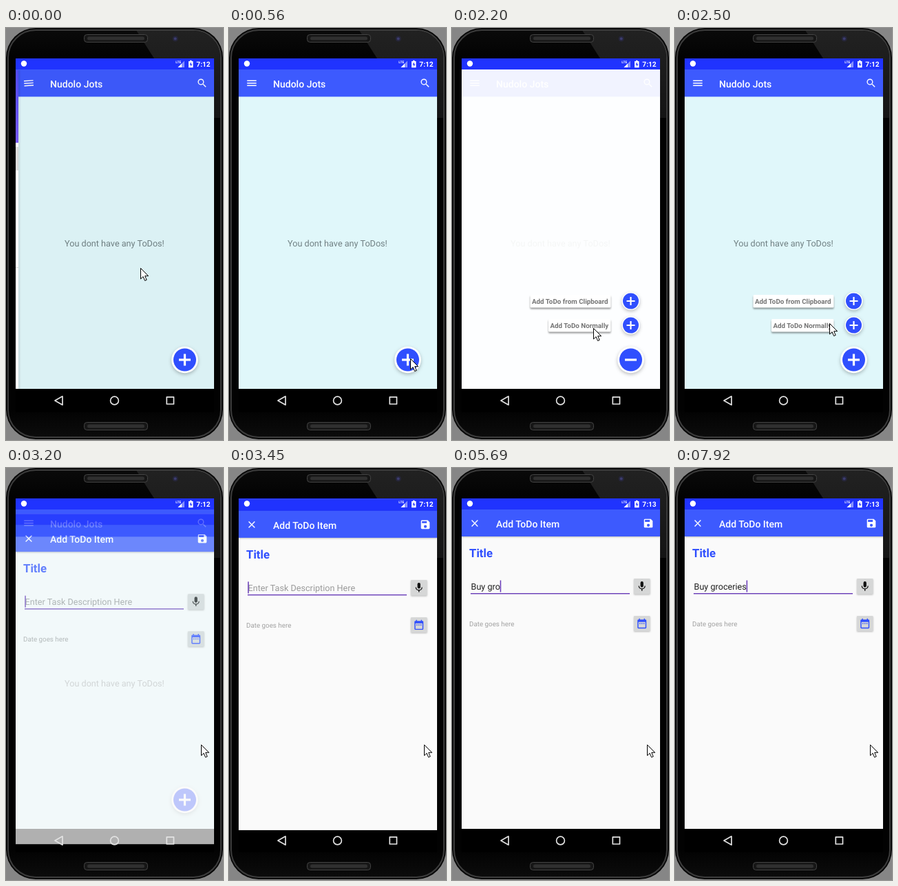
Recreate the animation shown at these times as an HTML page. Size 315x596 px, loop 8000 ms.

```html
<!DOCTYPE html>
<html lang="en">
<head>
<meta charset="utf-8">
<title>To-do app demo</title>
<style>
html, body { margin: 0; width: 100%; height: 100%; overflow: hidden; background: #868686; }
svg { display: block; width: 100vw; height: 100vh; }
text { font-family: Roboto, "Noto Sans", sans-serif; white-space: pre; text-rendering: geometricPrecision; }
.bar-title { font-size: 14px; font-weight: 500; fill: #fff; }
.body { font-size: 12.65px; }
.label { font-size: 9.8px; font-weight: 700; fill: #757575; }
.lift { filter: drop-shadow(0 2px 1.3px rgba(0, 0, 0, .4)); }
.float { filter: drop-shadow(0 2px 2.5px rgba(0, 0, 0, .25)); }
.bar { filter: drop-shadow(0 1px 1px rgba(0, 0, 0, .25)); }
</style>
</head>
<body>
<svg viewBox="0 0 315 596" preserveAspectRatio="none">
  <defs>
    <linearGradient id="shell" x2="0" y2="1">
      <stop offset="0" stop-color="#0a0a0a"/><stop offset=".07" stop-color="#020202"/>
      <stop offset=".93" stop-color="#020202"/><stop offset="1" stop-color="#0c0c0c"/>
    </linearGradient>
    <linearGradient id="sheen" x2="0" y2="1">
      <stop offset="0" stop-color="#222"/><stop offset="1" stop-color="#141414"/>
    </linearGradient>
    <linearGradient id="header" x2="0" y2="1">
      <stop offset="0" stop-color="#4f4cf0"/><stop offset="1" stop-color="#7658f2"/>
    </linearGradient>
    <linearGradient id="edge">
      <stop offset="0" stop-opacity=".1"/><stop offset="1" stop-opacity="0"/>
    </linearGradient>
    <clipPath id="screen"><rect x="14" y="44" width="288" height="512"/></clipPath>
    <clipPath id="body"><rect x="4" y="4" width="307" height="588" rx="39"/></clipPath>
    <g id="speaker">
      <rect x="113.5" y="-5.5" width="92" height="11" rx="4" fill="#161616" stroke="#444"/>
      <rect x="118" y="-2.5" width="83" height="5" rx="2.5" fill="#303030"/>
    </g>
    <path id="menu" d="M3 18h18v-2H3zm0-5h18v-2H3zm0-7v2h18V6z"/>
    <path id="close" d="M19 6.4 17.6 5 12 10.6 6.4 5 5 6.4 10.6 12 5 17.6 6.4 19 12 13.4 17.6 19 19 17.6 13.4 12z"/>
    <path id="search" d="M15.5 14h-.8l-.3-.3A6.5 6.5 0 1 0 13.7 14.4l.3.3v.8l5 5 1.5-1.5zm-6 0a4.5 4.5 0 1 1 0-9 4.5 4.5 0 0 1 0 9z"/>
    <path id="save" d="M17 3H5a2 2 0 0 0-2 2v14a2 2 0 0 0 2 2h14a2 2 0 0 0 2-2V7zm-5 16a3 3 0 1 1 0-6 3 3 0 0 1 0 6zm3-10H5V5h10z"/>
    <path id="mic" d="M12 14a3 3 0 0 0 3-3V5a3 3 0 0 0-6 0v6a3 3 0 0 0 3 3zm5.3-3a5.3 5.1 0 0 1-10.6 0H5a7 7 0 0 0 6 6.7V21h2v-3.3A7 7 0 0 0 19 11z"/>
    <path id="date" d="M9 11H7v2h2zm4 0h-2v2h2zm4 0h-2v2h2zm2-7h-1V2h-2v2H8V2H6v2H5a2 2 0 0 0-2 2v14a2 2 0 0 0 2 2h14a2 2 0 0 0 2-2V6a2 2 0 0 0-2-2zm0 16H5V9h14z"/>
    <g id="mini">
      <circle r="13" fill="#fff" class="float"/>
      <circle r="11.5" fill="#304ffe"/>
      <path d="M-6 0H6M0-6V6" stroke="#fff" stroke-width="2.2"/>
    </g>
  </defs>

  <!-- phone -->
  <rect width="315" height="596" fill="#868686"/>
  <rect width="315" height="595" rx="43" fill="#080808"/>
  <rect x="3" y="3" width="309" height="589" rx="40" fill="url(#shell)" stroke="#3c3c3c" stroke-width="2"/>
  <path d="M187 0H315V130H302V44H215z" fill="url(#sheen)" clip-path="url(#body)"/>
  <use href="#speaker" y="15"/>
  <use href="#speaker" y="576"/>
  <circle cx="245.7" cy="15.5" r="4" fill="#26263a"/>
  <circle cx="245.7" cy="15.5" r="2" fill="#3c3c70"/>
  <rect x="14" y="44" width="288" height="512" fill="#000"/>

  <g clip-path="url(#screen)">
    <rect x="14" y="44" width="288" height="17" fill="#2033fe"/>

    <g id="home">
      <rect x="14" y="60" width="288" height="462" fill="#e0f7fa"/>
      <rect x="14" y="60" width="288" height="39.4" fill="#3d5afe"/>
      <g id="burger"><use href="#menu" fill="#fff" transform="translate(33 79.8) scale(.75 .7) translate(-12 -12)"/></g>
      <text class="bar-title" x="64" y="85.6">Nudolo Jots</text>
      <use href="#search" fill="#fff" transform="translate(284.7 79.8) scale(.7) translate(-12 -12)"/>
      <text class="body" x="85" y="315.6" fill="#708083">You dont have any ToDos!</text>
      <g id="drawer">
        <rect x="14" y="61" width="288" height="461" opacity=".025"/>
        <rect x="18" y="61" width="4" height="461" fill="url(#edge)"/>
        <rect x="14" y="61" width="4" height="461" fill="#fff"/>
        <rect x="14" y="61" width="4" height="105" fill="url(#header)"/>
        <rect x="14" y="172" width="4" height="34" fill="#dcdcdc"/>
        <rect x="14" y="346" width="4" height="1" fill="#ddd"/>
      </g>
      <rect id="veil" x="14" y="60" width="288" height="462" fill="#fff" opacity=".93"/>
      <g id="clip">
        <rect class="lift" x="113.5" y="386" width="117" height="18.5" rx="1.5" fill="#fff"/>
        <text class="label" x="116" y="399">Add ToDo from Clipboard</text>
        <use href="#mini" x="259.5" y="395"/>
      </g>
      <g id="normal">
        <rect class="lift" x="140" y="421" width="90.5" height="18.5" rx="1.5" fill="#fff"/>
        <text class="label" x="142.5" y="434">Add ToDo Normally</text>
        <use href="#mini" x="259.5" y="430"/>
      </g>
      <g transform="translate(259.5 480)">
        <circle r="19.3" fill="#fff" class="float"/>
        <circle r="16.5" fill="#304ffe"/>
        <path id="minus" d="M-8.5 0H8.5" stroke="#fff" stroke-width="3.2"/>
        <path id="upright" d="M0-8.5V8.5" stroke="#fff" stroke-width="3.2"/>
      </g>
    </g>

    <g id="editor">
      <rect x="14" y="44" width="288" height="478" fill="#fafafa"/>
      <rect x="14" y="44" width="288" height="17" fill="#2033fe"/>
      <rect class="bar" x="14" y="60" width="288" height="39" fill="#3d5afe"/>
      <use href="#close" fill="#fff" transform="translate(33 80) scale(.7) translate(-12 -12)"/>
      <text class="bar-title" x="64" y="85.6">Add ToDo Item</text>
      <use href="#save" fill="#fff" transform="translate(285 80) scale(.7) translate(-12 -12)"/>
      <text x="25" y="128.7" font-size="16.8" font-weight="700" fill="#304ffe">Title</text>
      <text id="field" class="body" x="27.5" y="175.8"></text>
      <rect x="27" y="181" width="231" height="1.4" fill="#673ab7"/>
      <rect id="caret" y="162.5" width="1.5" height="17" fill="#673ab7"/>
      <rect class="bar" x="264" y="160" width="23.5" height="22.5" rx="1" fill="#d6d7d7"/>
      <use href="#mic" fill="#111" transform="translate(275.7 171.2) scale(.72) translate(-12 -12)"/>
      <text x="25" y="229" font-size="9.8" fill="#a2a2a2">Date goes here</text>
      <rect class="bar" x="264" y="214" width="23.5" height="22" rx="1" fill="#d6d7d7"/>
      <use href="#date" fill="#304ffe" transform="translate(275.7 225) scale(.72) translate(-12 -12)"/>
    </g>

    <!-- status and navigation bars -->
    <circle cx="26" cy="51.5" r="4.2" fill="#fff"/>
    <text x="246.3" y="51.3" font-size="4.8" font-weight="700" fill="#fff">LTE</text>
    <path d="M259 47.5V57H249.5z" fill="#fff" opacity=".45"/>
    <path d="M255 51.5V57H249.5z" fill="#fff"/>
    <path d="M265 48h2v-1.3h2.5V48h2v9.3h-6.5z" fill="#fff"/>
    <path d="M268.8 49.2 266.5 53h1.5v3l2.3-3.8h-1.5z" fill="#2033fe"/>
    <text id="clock" x="276.3" y="55.9" font-size="10.2" font-weight="700" fill="#fff"></text>
    <g fill="none" stroke="#e2e2e2" stroke-width="1.7" stroke-linejoin="round">
      <path d="M71 539 82 532.8v12.4z"/>
      <circle cx="157.5" cy="539" r="5.9"/>
      <rect x="233.3" y="533.8" width="10.2" height="10.2"/>
    </g>
  </g>

  <path id="mouse" d="M.5.5V16l3.6-3.4L6.6 18.5l2.6-1.1L6.7 11.7h5z" fill="#fff" stroke="#000" stroke-linejoin="round"/>
</svg>
<script>
const LOOP = 8000;
// The screen refreshes only at these moments.
const TICKS = [0, 160, 290, 430, 560, 870, 990, 1120, 1250, 1390, 1520, 1660, 1930, 2070, 2200,
  2500, 2630, 2770, 2900, 3200, 3330, 3450, 3570, 3850, 4280, 4560, 4840, 5010, 5180, 5350,
  5520, 5690, 6120, 6260, 6390, 6670, 6950, 7390, 7920];
const MOUSE = [[0, 195, 347], [160, 200, 358], [430, 248, 452], [560, 263, 478], [870, 265, 479],
  [1120, 265, 479], [1660, 205, 453], [1930, 205, 446], [2200, 205, 434], [2500, 224, 427],
  [2900, 283, 400]];
const TASK = "Buy groceries";
const KEYS = [4560, 4840, 5010, 5180, 5350, 5520, 5690, 6120, 6260, 6390, 6670, 6670, 6950];
const HIDDEN_CARET = [[3850, 4280], [7390, 7920]];

const el = {};
for (const node of document.querySelectorAll("svg [id]")) el[node.id] = node;

const clamp = x => Math.min(1, Math.max(0, x));
const between = (t, a, b) => t >= a && t < b;
const show = (node, on) => node.setAttribute("display", on ? "inline" : "none");
const move = (node, x, y) => node.setAttribute("transform", `translate(${x} ${y})`);
const setText = (node, s) => { if (node.textContent !== s) node.textContent = s; };

function mouseAt(t) {
  const next = MOUSE.findIndex(k => k[0] > t);
  if (next < 0) return MOUSE[MOUSE.length - 1].slice(1);
  const [t0, x0, y0] = MOUSE[next - 1], [t1, x1, y1] = MOUSE[next];
  const u = (t - t0) / (t1 - t0);
  return [Math.round(x0 + (x1 - x0) * u), Math.round(y0 + (y1 - y0) * u)];
}

// 0 = tucked behind the round button, 1 = fully fanned out
function fanAt(t) {
  if (t < 2500) return 1 - (1 - clamp((t - 860) / 250)) ** 2;
  return 1 - clamp((t - 2500) / 260) ** 2;
}

function drawHome(t) {
  const open = between(t, 870, 2500), fan = fanAt(t);
  show(el.drawer, t < 160);
  el.burger.setAttribute("transform", t < 160 ? "rotate(-4 33 79.5)" : "");
  show(el.veil, open);
  for (const [node, travel] of [[el.clip, 85], [el.normal, 50]]) {
    show(node, t >= 870 && fan > 0);
    move(node, 0, travel * (1 - fan));
  }
  show(el.upright, !open);
  el.minus.setAttribute("opacity", between(t, 870, 990) ? .75 : 1);
}

function drawEditor(t) {
  show(el.editor, t >= 3200);
  move(el.editor, 0, 35 * (1 - clamp((t - 3120) / 480)) ** 2.5);
  el.editor.setAttribute("opacity", clamp((t - 3080) / 170));

  const typed = TASK.slice(0, KEYS.filter(k => k <= t).length);
  setText(el.field, typed || "Enter Task Description Here");
  el.field.setAttribute("fill", typed ? "#212121" : "#9a9a9a");
  const width = typed ? el.field.getComputedTextLength() : 0;
  el.caret.setAttribute("x", 27.3 + width);
  show(el.caret, !HIDDEN_CARET.some(([a, b]) => between(t, a, b)));
}

const start = performance.now();
function frame() {
  const now = (performance.now() - start) % LOOP;
  const t = TICKS.filter(k => k <= now).pop();
  drawHome(t);
  drawEditor(t);
  setText(el.clock, t < 3850 ? "7:12" : "7:13");
  move(el.mouse, ...mouseAt(t));
  requestAnimationFrame(frame);
}
frame();
</script>
</body>
</html>
```
